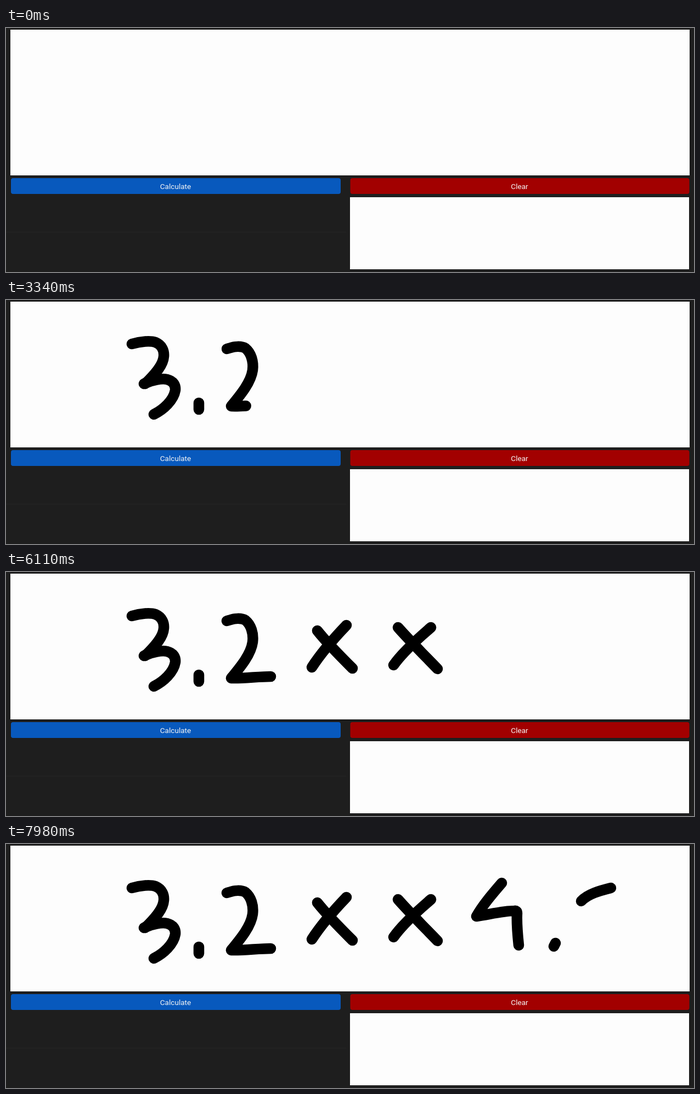
Animation, 1254 px wide and 447 px high, one loop 8 s. Source, as an HTML page:

```html
<!DOCTYPE html>
<html lang="en">
<head>
<meta charset="utf-8">
<title>Handwriting calculator</title>
<style>
  html, body { margin: 0; width: 100%; height: 100%; overflow: hidden; background: #1e1e1e; }
  svg { display: block; width: 100vw; height: 100vh; }
  .paper { fill: #fdfdfd; }
  .label { font: 13.6px Roboto, "Open Sans", sans-serif; fill: #f6f6f6; text-anchor: middle; }

  /* Offset 101 hides a stroke, 100 is pen down, 0 is fully drawn. */
  .ink path {
    fill: none;
    stroke: #000;
    stroke-width: 19.5;
    stroke-linecap: round;
    stroke-linejoin: round;
    stroke-dasharray: 100 200;
    stroke-dashoffset: 101;
    animation: 8s linear infinite;
  }
  .ink .three-top { animation-name: three-top; }
  .ink .three-low { animation-name: three-low; }
  .ink .point-a { animation-name: point-a; }
  .ink .two { animation-name: two; }
  .ink .slash-a { animation-name: slash-a; }
  .ink .back-a { animation-name: back-a; }
  .ink .slash-b { animation-name: slash-b; }
  .ink .back-b { animation-name: back-b; }
  .ink .four { animation-name: four; }
  .ink .point-b { animation-name: point-b; }
  .ink .last { animation-name: last; }

  @keyframes three-top {
    0%, 12.49% { stroke-dashoffset: 101; }
    12.5% { stroke-dashoffset: 100; }
    18.875%, 100% { stroke-dashoffset: 0; }
  }
  @keyframes three-low {
    0%, 18.87% { stroke-dashoffset: 101; }
    18.88% { stroke-dashoffset: 100; }
    24.625%, 100% { stroke-dashoffset: 0; }
  }
  @keyframes point-a {
    0%, 26.36% { stroke-dashoffset: 101; }
    26.37% { stroke-dashoffset: 100; }
    30.125%, 100% { stroke-dashoffset: 0; }
  }
  @keyframes two {
    0%, 32.99% { stroke-dashoffset: 101; }
    33% { stroke-dashoffset: 100; }
    35.5% { stroke-dashoffset: 96.6; }
    43.375%, 100% { stroke-dashoffset: 0; }
  }
  @keyframes slash-a {
    0%, 45.86% { stroke-dashoffset: 101; }
    45.87% { stroke-dashoffset: 100; }
    50.5%, 100% { stroke-dashoffset: 0; }
  }
  @keyframes back-a {
    0%, 52.63% { stroke-dashoffset: 101; }
    52.64% { stroke-dashoffset: 100; }
    57.125%, 100% { stroke-dashoffset: 0; }
  }
  @keyframes slash-b {
    0%, 59.24% { stroke-dashoffset: 101; }
    59.25% { stroke-dashoffset: 100; }
    65.4%, 100% { stroke-dashoffset: 0; }
  }
  @keyframes back-b {
    0%, 66.59% { stroke-dashoffset: 101; }
    66.6% { stroke-dashoffset: 100; }
    73%, 100% { stroke-dashoffset: 0; }
  }
  @keyframes four {
    0%, 76.38% { stroke-dashoffset: 101; }
    76.39% { stroke-dashoffset: 100; }
    86.375% { stroke-dashoffset: 29.5; }
    89.25%, 100% { stroke-dashoffset: 0; }
  }
  @keyframes point-b {
    0%, 90.74% { stroke-dashoffset: 101; }
    90.75% { stroke-dashoffset: 100; }
    92.25%, 100% { stroke-dashoffset: 0; }
  }
  @keyframes last {
    0%, 94.74% { stroke-dashoffset: 101; }
    94.75% { stroke-dashoffset: 100; }
    99.75%, 100% { stroke-dashoffset: 0; }
  }
</style>
</head>
<body>
<svg viewBox="0 0 1254 447" preserveAspectRatio="none">
  <rect width="1254" height="447" fill="#1e1e1e"/>
  <rect y="373" width="620" height="2" fill="#222"/>
  <rect class="paper" x="8" y="3" width="1238" height="267"/>
  <rect class="paper" x="627" y="310" width="618" height="132"/>
  <rect x="9" y="275" width="601" height="29" rx="4" fill="#0859bd"/>
  <rect x="627.5" y="275" width="618" height="29" rx="4" fill="#a20000"/>
  <text class="label" x="309" y="295">Calculate</text>
  <text class="label" x="936" y="295">Clear</text>
  <g class="ink" transform="translate(.5 .5)">
    <path class="three-top" pathLength="100" d="M229 80C245 75 263 74 272 77C284 82 288 93 287 103C286 118 273 134 253 153"/>
    <path class="three-low" pathLength="100" d="M251 153C265 146 284 143 293 145C305 148 309 156 308 165C305 183 287 200 269 209"/>
    <path class="point-a" pathLength="100" d="M351 188L351 200"/>
    <path class="two" pathLength="100" d="M402 89L409 87C414 85 428 83 436 88C446 96 451 112 449 128C446 150 428 172 410 194C430 195 460 191 482 191"/>
    <path class="slash-a" pathLength="100" d="M620 97C600 118 575 146 557 174"/>
    <path class="back-a" pathLength="100" d="M567 107C585 130 610 155 631 176"/>
    <path class="slash-b" pathLength="100" d="M774 101C752 120 722 147 706 170"/>
    <path class="back-b" pathLength="100" d="M714 101C735 125 762 152 786 177"/>
    <path class="four" pathLength="100" d="M903 71C885 92 868 112 857 132C879 129 905 122 926 122Q931 121 931 126C930 146 932 166 934 185"/>
    <path class="point-b" pathLength="100" d="M1001 181L998 187"/>
    <path class="last" pathLength="100" d="M1102 80C1082 85 1060 91 1048 104"/>
  </g>
</svg>
</body>
</html>
```
